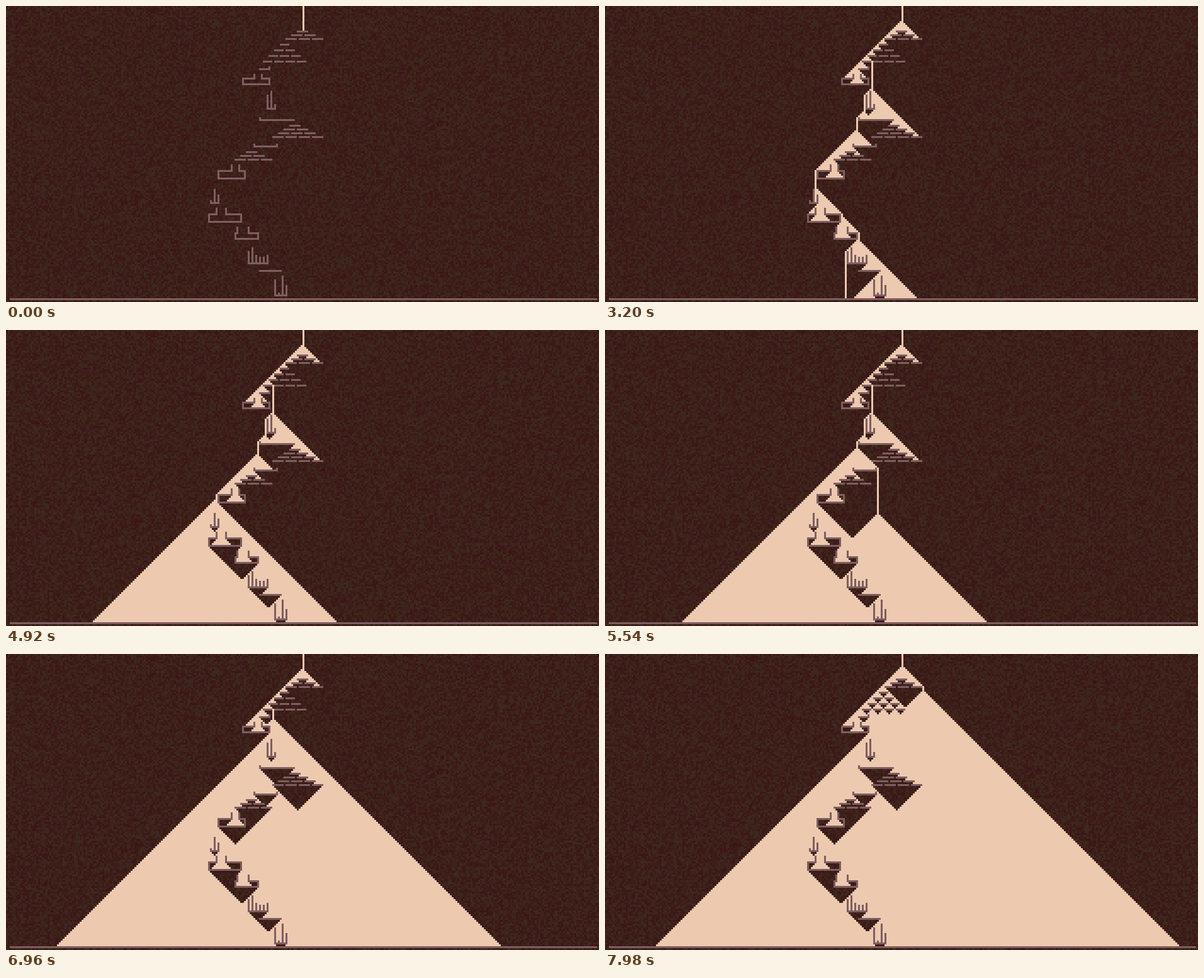
Write an HTML page with a canvas that moves like this. It is 942 px wide and 471 px high and loops after 8000 ms.

```html
<!DOCTYPE html>
<html lang="en">
<head>
<meta charset="utf-8">
<title>Falling sand</title>
<style>
  html, body { margin: 0; width: 100%; height: 100%; overflow: hidden; background: #3d2019; }
  canvas { display: block; width: 942px; height: 471px; }
</style>
</head>
<body>
<canvas id="stage" width="942" height="471"></canvas>
<script>
const CELL = 3, COLS = 314, ROWS = 157, FLOOR = 155, SOURCE = 157;
const STEP = 20, STEPS = 400;
const SAND = '#edc9af', ROCK = '#7e5e60';

const ctx = document.getElementById('stage').getContext('2d');
const blocked = new Uint8Array(COLS * ROWS);
const at = (x, y) => y * COLS + x;

function paint(x, y, color) {
  ctx.fillStyle = color;
  ctx.fillRect(x * CELL, y * CELL, CELL, CELL);
}

// Background: every cell is a random mix of two dark browns.
function drawGround() {
  let seed = 7;
  const random = () => (seed = (seed * 16807) % 2147483647) / 2147483647;
  for (let y = 0; y < ROWS; y++) {
    for (let x = 0; x < COLS; x++) {
      const k = random();
      paint(x, y, `rgb(${Math.round(60 + k)},${Math.round(20 + 23 * k)},${Math.round(20 + 11 * k)})`);
    }
  }
}

// Rock builders
function rock(x, y) {
  blocked[at(x, y)] = 1;
  paint(x, y, ROCK);
}
function row(x1, x2, y) {
  for (let x = x1; x <= x2; x++) rock(x, y);
}
function column(x, y1, y2) {
  for (let y = y1; y <= y2; y++) rock(x, y);
}
function pyramid(x, y, rows, width, gap) {
  for (let r = 0; r < rows; r++) {
    for (let i = 0; i <= r; i++) {
      const left = x - 3 * r + i * (width + 1);
      row(left, left + width - 1, y + r * gap);
    }
  }
}
function bottle(left, right, neckL, neckR, top, shoulder, base) {
  column(neckL, top, shoulder);
  column(neckR, top, shoulder);
  row(left, neckL, shoulder);
  row(neckR, right, shoulder);
  column(left, shoulder, base);
  column(right, shoulder, base);
  row(left, right, base);
}
function comb(x, base, ...tops) {
  row(x, x + 2 * (tops.length - 1), base);
  tops.forEach((top, i) => column(x + 2 * i, top, base));
}
function shelf(x1, x2, y, ...lips) {
  row(x1, x2, y);
  lips.forEach(x => rock(x, y - 1));
}

function drawRocks() {
  pyramid(154, 13, 3, 6, 2);
  pyramid(145, 20, 4, 5, 3);
  shelf(134, 139, 33, 139);
  bottle(125, 139, 131, 135, 36, 38, 41);
  comb(138, 54, 47, 45, 52);
  shelf(134, 152, 60, 134);
  pyramid(150, 63, 4, 6, 2);
  shelf(131, 143, 74, 131, 143);
  pyramid(127, 77, 3, 6, 2);
  bottle(112, 126, 119, 123, 84, 87, 91);
  comb(108, 104, 103, 97, 100);
  bottle(107, 124, 111, 116, 107, 110, 114);
  bottle(121, 133, 122, 128, 117, 120, 123);
  comb(128, 136, 130, 128, 132, 133, 133, 132);
  shelf(134, 145, 140);
  comb(142, 153, 145, 152, 143, 148);
  row(2, 312, FLOOR);
}

// Depth-first pour: down, then left, then right.
// A step ends whenever a straight fall has been filled up.
const grains = [], ends = [];
const free = (x, y) => y < FLOOR && !blocked[at(x, y)];

function pour(x, y) {
  if (ends.length === STEPS || !free(x, y)) return;
  blocked[at(x, y)] = 1;
  grains.push([x, y]);
  if (free(x, y + 1)) {
    pour(x, y + 1);
    const last = ends.length ? ends[ends.length - 1] : 0;
    if (ends.length < STEPS && grains.length > last) ends.push(grains.length);
  }
  pour(x - 1, y + 1);
  pour(x + 1, y + 1);
}

drawGround();
drawRocks();
const empty = ctx.getImageData(0, 0, COLS * CELL, ROWS * CELL);
pour(SOURCE, 0);

let drawn = 0;
function render(time) {
  const step = Math.floor(time / STEP) % STEPS;
  const end = ends[Math.min(step, ends.length - 1)];
  if (end < drawn) {
    ctx.putImageData(empty, 0, 0);
    drawn = 0;
  }
  for (; drawn < end; drawn++) paint(...grains[drawn], SAND);
}

const start = performance.now();
function tick() {
  render(performance.now() - start);
  requestAnimationFrame(tick);
}
tick();
</script>
</body>
</html>
```
